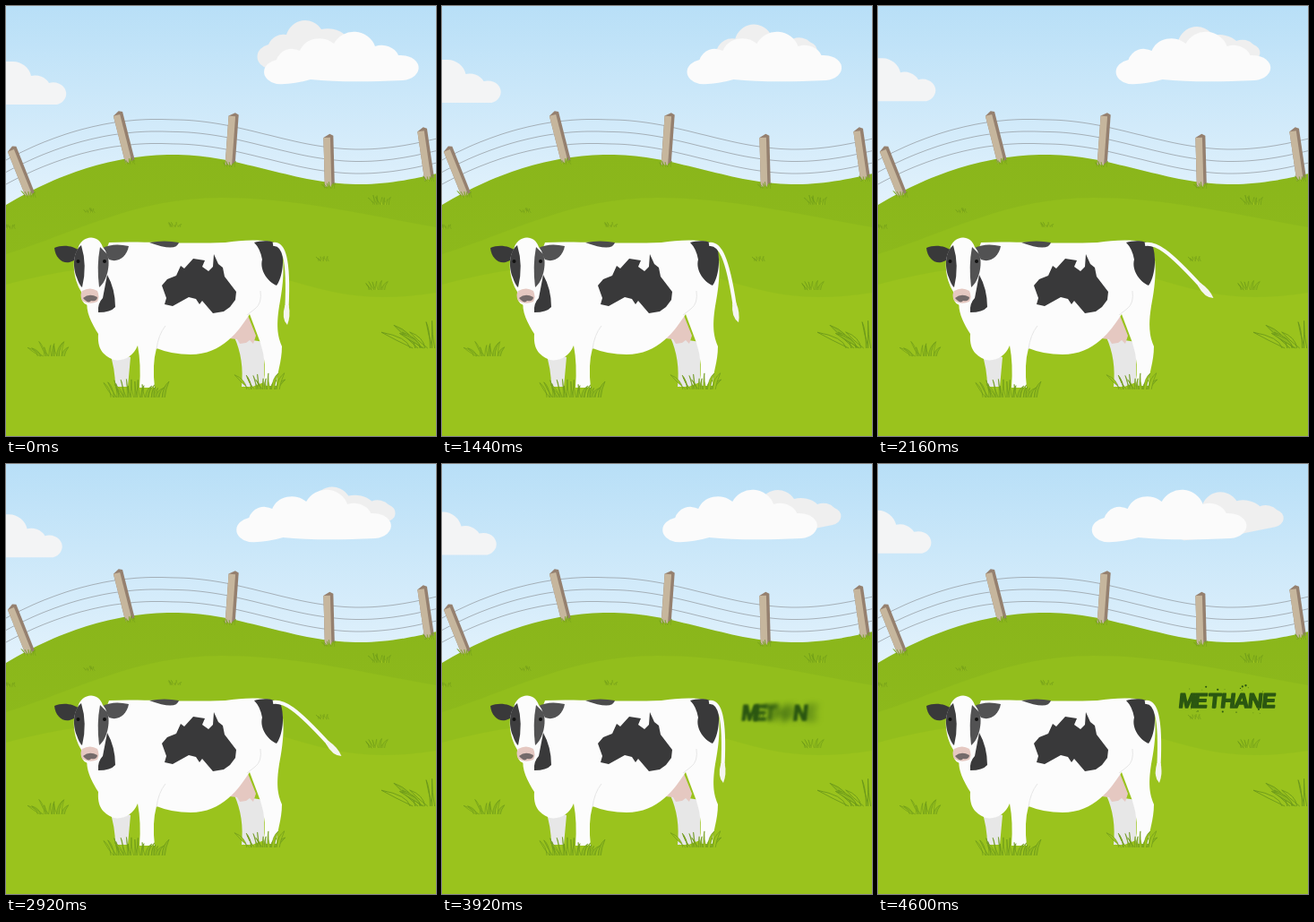
Animation, 480 px wide and 480 px high, one loop 4640 ms. Source, as an HTML page:

```html
<!DOCTYPE html>
<html lang="en">
<head>
<meta charset="utf-8">
<title>Cow on a meadow</title>
<style>
html, body { margin: 0; width: 100%; height: 100%; overflow: hidden; }
svg { display: block; width: 100vw; height: 100vh; }
#word { fill: #2b5711; stroke: #2b5711; stroke-linejoin: round; }
#word text { font: bold 23px "Liberation Sans", Arial, sans-serif; text-anchor: middle; stroke-width: 1.5; }
#word circle { stroke: none; }
</style>
</head>
<body>
<svg viewBox="0 0 480 480">
  <defs>
    <linearGradient id="sky" x2="0" y2="1"><stop stop-color="#b8dff7"/><stop offset="1" stop-color="#e3f2fc"/></linearGradient>
    <linearGradient id="far" x2="0" y2="1"><stop stop-color="#8ab61b"/><stop offset="1" stop-color="#91be1c"/></linearGradient>
  </defs>
  <rect width="480" height="225" fill="url(#sky)"/>
  <path id="left" fill="#f3f4f5" d="M-9 62H8A21 21 0 0 1 28 78A18 17 0 0 1 48 86A14 12 0 0 1 57 110H-9Z"/>
  <path id="back" fill="#efefef" d="M293 70A17 14 0 0 1 293 43A18 18 0 0 1 313 32A22 23 0 0 1 352 26A25 20 0 0 1 378 32A16 14 0 0 1 397 36A12 10 0 0 1 395 55L340 66Z"/>
  <path id="front" fill="#fbfbfb" d="M302 87A19 14 0 0 1 302 60A18 17 0 0 1 328 50A23 20 0 0 1 366 42A25 24 0 0 1 412 45A20 18 0 0 1 438 55A20 14 0 0 1 443 83Q380 86 340 82Q320 88 302 87Z"/>

  <path id="ridge" fill="url(#far)"/>
  <path fill="#92be1c" d="M0 277C80 252 145 214 240 214C320 214 390 231 480 247V480H0Z"/>
  <path fill="#9ac31d" d="M0 311C60 295 120 286 200 286C290 286 340 325 420 325Q450 325 480 320V480H0Z"/>
  <g id="wires" fill="none" stroke="#98a0a6" stroke-width=".8"></g>
  <g id="posts"></g>
  <g id="grass"></g>

  <g fill="#fcfcfc">
    <path fill="#e7e7e7" d="M115 384L139 392L136 425H122Q122 405 115 384ZM255 370Q266 394 263 425H275L288 420V375Z"/>
    <path fill="#e5c8c1" d="M269 343L279 368L276 377L272 373L268 376L261 377L258 372L249 371Z"/>
    <path d="M115 264C150 262 190 266 245 264C265 261 292 260 303 266C312 276 311 305 305 335C301 360 304 370 308 380C308 398 302 410 302 424H287Q292 400 284 376L272 344C260 362 242 389 206 389Q185 389 168 382Q163 400 166 426H149Q151 400 147 379C142 391 132 397 120 395C107 389 102 382 103 366C96 355 88 340 91 328Z"/>
    <path fill="none" stroke="#e6e6e6" d="M178 357Q170 367 168 383M284 318Q286 332 278 338L269 345"/>
    <g fill="#39393a">
      <path d="M113 300Q122 316 122 336Q117 342 103 342Q102 332 108 326Z"/>
      <path fill="#4b4b4c" d="M160 264Q177 261 193 264Q190 275 160 264Z"/>
      <path d="M277 264C287 261 299 261 307 269C312 287 307 306 302 312C291 307 283 294 286 283Q284 271 277 264Z"/>
      <path d="M174 312L180 305L190 301L195 290L199 293L209 282L222 284L219 291L226 296L231 291L232 277L237 288L242 292L244 302L257 319L256 328L250 336L243 341L231 343L219 329L216 333L212 327L204 325L186 335L177 333L179 326Z"/>
      <path d="M83 274C75 267 63 266 54 270C55 281 63 288 71 286Q78 284 83 278Z"/>
      <path fill="#525253" d="M108 270Q120 264 137 268C135 280 125 287 115 283Z"/>
    </g>
    <path d="M80 272C83 256 103 253 108 269C118 280 114 302 105 314L104 328Q100 335 91 334Q83 332 84 319C75 304 73 283 80 272Z"/>
    <path fill="#3e3e3f" d="M84 267C75 274 74 291 79 303Q82 312 85 314Q91 290 84 267Z"/>
    <path fill="#525253" d="M105 269Q101 290 104 314C113 307 117 288 113 277Z"/>
    <path fill="#e5c8c1" d="M85 318Q94 313 102 318Q105 325 102 330Q93 334 85 329Q82 323 85 318Z"/>
    <path fill="#746a6a" d="M86 326Q93 320 102 325Q102 330 95 329Q92 333 86 326Z"/>
    <g fill="#111"><circle cx="80.500" cy="285" r="2"/><circle cx="110" cy="285" r="2"/></g>
    <path id="tail" fill="none" stroke="#fafafa" stroke-width="4.200"/>
    <path id="tuft" fill="#f5f5f0" d="M311.400 334Q307 349 314 356Q318 346 315.600 334Z"/>
  </g>
  <g id="feet"></g>
  <g id="word"></g>
</svg>
<script>
const $ = id => document.getElementById(id);
const clamp = v => Math.min(1, Math.max(0, v));
let seed = 7;
const rand = () => (seed = seed * 16807 % 2147483647) / 2147483647;

function add(parent, tag, attrs) {
  const el = document.createElementNS('http://www.w3.org/2000/svg', tag);
  for (const k in attrs) el.setAttribute(k, attrs[k]);
  return $(parent).appendChild(el);
}

// Ridge: a parabola up to its top at x = 187, then a cosine wave
const ridge = x => x < 187
  ? 166 + 56 * (1 - x / 187) ** 2
  : 182.5 - 16.5 * Math.cos((x - 187) * Math.PI / 208);
const wire = x => ridge(x) - 39 - 11 * Math.max(0, 1 - x / 187);

function trace(f) {
  let d = '';
  for (let x = 0; x <= 480; x += 6) d += `${x ? 'L' : 'M'}${x} ${f(x).toFixed(1)}`;
  return d;
}
$('ridge').setAttribute('d', trace(ridge) + 'V480H0Z');
for (let i = 0; i < 3; i++) add('wires', 'path', { d: trace(x => wire(x) + 13.5 * i) });

// Blades fan out around the middle of the tuft
function tuft(parent, x, y, w, h, n, tilt = 0) {
  for (let i = 0; i < n; i++) {
    const side = (i + rand()) / n - .5, tall = h * (.5 + .5 * rand());
    const lean = (side + tilt + rand() * .4 - .2) * h, bx = x + side * w * .7;
    add(parent, 'path', {
      fill: i % 2 ? '#8db81d' : '#9cc41e', stroke: '#6a961b', 'stroke-width': .3 + h / 60,
      d: `M${bx} ${y}q${lean * .1} ${-tall * .7} ${lean} ${-tall}q${-lean * .5} ${tall * .5} ${3 - lean} ${tall}`
    });
  }
}

[-22, -14, 4, -1.5, -8].forEach((lean, i) => {
  const x = 27 + 111.3 * i, y = ridge(x) + 5;
  const transform = `translate(${x} ${y}) rotate(${Math.atan(lean / 55) * 180 / Math.PI})`;
  add('posts', 'path', { transform, fill: '#95806f', d: 'M-5 0V-55L2 -59L6 -57V-2Z' });
  add('posts', 'path', { transform, fill: '#c6b69d', d: 'M-5 0V-55H2.500V0Z' });
  tuft('grass', x - 1, y + 2, 13, 8, 6);
});
for (const [x, y] of [[93, 231], [187, 247], [353, 285], [3, 249]]) tuft('grass', x, y, 14, 6, 6);
for (const [x, y] of [[417, 222], [412, 317]]) tuft('grass', x, y, 24, 11, 8);
tuft('grass', 50, 391, 42, 17, 10);
tuft('grass', 468, 382, 50, 33, 9, -.4);
tuft('feet', 145, 437, 84, 21, 20);
tuft('feet', 286, 428, 50, 20, 13);

// Early letters have a low place in the order of focusing
const order = [0, 1, 3, 5, 6, 0, 6];
const letters = [...'METHANE'].map((char, i) => {
  const el = add('word', 'text', {});
  el.textContent = char;
  return { el, offset: 15.2 * i, start: 3200 + 75 * order[i] };
});
const drops = Array.from({ length: 20 }, () => {
  const cy = 263 + (rand() < .5 ? 1 : -1) * (9 + rand() * 7);
  return add('word', 'circle', { cx: 345 + rand() * 85, cy, r: .3 + rand() * .9 });
});

function drawTail(lift) {
  const a = lift * Math.PI / 4, c = Math.cos(a), s = Math.sin(a);
  const turn = (dx, dy) => `${308 + dx * c + dy * s} ${268 - dx * s + dy * c} `;
  $('tail').setAttribute('d', `M298 266C310 264 ${turn(8, 14)}${turn(5.5, 68)}`);
  $('tuft').setAttribute('transform', `rotate(${-45 * lift} 308 268)`);
}

function draw(t) {
  const u = Math.max(0, t - 120), v = Math.max(0, t - 680), rest = 4600 - t;
  const move = (el, x, y) => el.setAttribute('transform', `translate(${x} ${y})`);
  move($('front'), -.011 * u, 0);
  move($('back'), .0108 * u, .0034 * u);
  move($('left'), -.002 * v, -.0026 * v);
  drawTail(t < 2600 ? clamp((t - 1200) / 960) : 1 - clamp((t - 2960) / 960) ** 1.3);

  const spread = 1 - .00038 * rest, rise = .0215 * rest;
  for (const { el, offset, start } of letters) {
    const k = clamp((t - start) / 950);
    el.setAttribute('transform', `translate(${344.5 - .002 * rest + offset * spread} ${271.5 + rise}) skewX(-6)`);
    el.style.opacity = clamp(k * 1.8);
    el.style.filter = k < 1 ? `blur(${6 * (1 - k) ** 1.3}px)` : 'none';
  }
  for (const el of drops) {
    move(el, 0, rise);
    el.style.opacity = clamp((t - 4000) / 500);
  }
}

const begin = performance.now();
function tick() {
  draw(Math.floor((performance.now() - begin) % 4640 / 40) * 40);
  requestAnimationFrame(tick);
}
tick();
</script>
</body>
</html>
```
